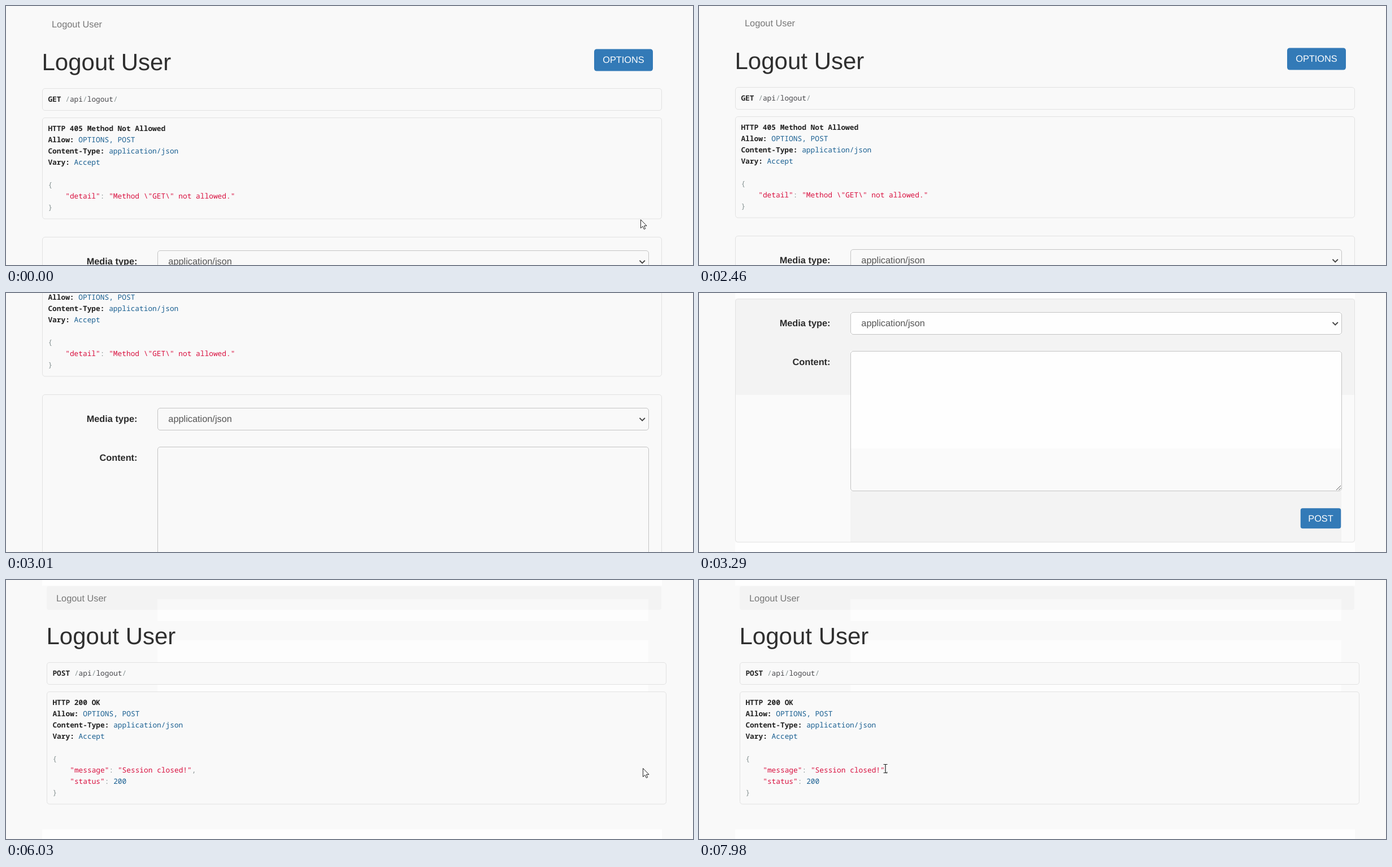
Recreate the animation shown at these times as an HTML page. Size 1216 px wide and 460 px high, loop 8 s.

```html
<!DOCTYPE html>
<html lang="en">
<head>
<meta charset="utf-8">
<title>Logout User</title>
<style>
  html, body { margin: 0; width: 100%; height: 100%; overflow: hidden; background: #f9f9f9; }
  svg { display: block; }
  text { font: 16.33px "Liberation Sans", Arial, sans-serif; fill: #333; text-rendering: geometricPrecision; }
  .mono { font: 12.83px "Noto Sans Mono", "DejaVu Sans Mono", monospace; }
  .bold { font-weight: 700; fill: #222; }
  .title { font-size: 42px; fill: #2f2f2f; }
  .nav { fill: #777; }
  .label { font-weight: 700; text-anchor: end; fill: #2b2b2b; }
  .field { fill: #555; }
  .caption { fill: #fff; text-anchor: middle; }
  .pun { fill: #889494; }
  .val { fill: #195f91; }
  .str { fill: #d9103f; }
  .path { fill: #48484c; }
</style>
</head>
<body>
<svg id="stage" width="1216" height="460" viewBox="0 0 1216 460"></svg>
<script>
const LOOP = 8000, STEP = 70;
const HIDE_AT = 770, REST_AT = 3290, RETURN_AT = 3720, PRESS_AT = 4540, RESULT_AT = 5270;
const LEADING = 20, CHAR = 7.7, PAD = 10.4;

// ---- markup helpers ----
const text = (x, y, cls, s) => `<text x="${x}" y="${y}" class="${cls}">${s}</text>`;
const mono = (x, y, runs) => text(x, y, 'mono', runs.map(([cls, s]) =>
  `<tspan class="${cls}">${s.replace(/ /g, '\u00a0')}</tspan>`).join(''));
const tone = (x, y, w, h, fill, rx = 0) =>
  `<rect x="${x}" y="${y}" width="${w}" height="${h}" rx="${rx}" fill="${fill}"/>`;
const box = (x, y, w, h, stroke = '#e2e2e2', fill = 'none') =>
  `<rect x="${x + .5}" y="${y + .5}" width="${w - 1}" height="${h - 1}" rx="4.5" fill="${fill}" stroke="${stroke}"/>`;
const panel = (x, y, h) => box(x, y, 1097, h, '#e2e2e2', '#f9f9f9');
const field = (y, h) => box(268, y, 870, h, '#c4c4c4');
const band = (y, h, fill) => tone(268, y, 869, h, fill);
const edges = tone(64, 0, 1097, 10, '#fefefe') + tone(64, 443, 1097, 17, '#fefefe');

// The part both pages share: heading, request line, response headers and body.
function response(x, verb, status, rows) {
  const left = x + PAD;
  const lines = [
    [['bold', status]],
    [['bold', 'Allow: '], ['val', 'OPTIONS, POST']],
    [['bold', 'Content-Type: '], ['val', 'application/json']],
    [['bold', 'Vary: '], ['val', 'Accept']],
    [],
    [['pun', '{']],
    ...rows.map(row => [['str', '    '], ...row]),
    [['pun', '}']]
  ];
  return text(x + 17, 37.5, 'nav', 'Logout User') + text(x - .5, 114, 'title', 'Logout User') +
    panel(x, 146, 40) +
    mono(left, 170, [['bold', verb + ' '], ['pun', '/'], ['path', 'api'], ['pun', '/'], ['path', 'logout'], ['pun', '/']]) +
    panel(x, 198, lines.length * LEADING + 20.5) +
    lines.map((runs, i) => mono(left, 222 + i * LEADING, runs)).join('');
}

// ---- scenes ----
const restTones = edges +
  tone(64, 11, 1097, 170, '#f3f3f3', 4) + tone(64, 181, 1097, 261, '#fafafa') +
  band(352, 90, '#f3f3f3') + band(34, 40, '#fefefe') +
  band(103, 173, '#fefefe') + band(276, 76, '#fafafa');

const formPage =
  response(64, 'GET', 'HTTP 405 Method Not Allowed',
    [[['str', '"detail"'], ['pun', ': '], ['str', '"Method \\"GET\\" not allowed."']]]) +
  tone(1041, 76.5, 104, 39, '#337ab7', 4.5) + text(1093, 101, 'caption', 'OPTIONS') +
  box(64, 410, 1097, 433) +
  text(232.5, 459, 'label', 'Media type:') +
  field(434, 40) + text(287.3, 459, 'field', 'application/json') +
  '<path d="M1121.5 452l4.7 4.7 4.7-4.7" fill="none" stroke="#444" stroke-width="1.8"/>' +
  text(232.5, 528, 'label', 'Content:') +
  field(503, 249) +
  '<path d="M1128 750l8-8M1132.5 750l3.5-3.5" stroke="#555"/>' +
  '<g id="ring">' + tone(1063, 780.5, 75, 39.5, '#14181c', 5) + tone(1064.5, 782, 72, 36.5, '#fff', 4) + '</g>' +
  '<rect id="post" x="1065.5" y="783" width="70" height="34.5" rx="3" stroke-width="1.5"/>' +
  text(1100.5, 806, 'caption', 'POST');

const resultPage = edges +
  tone(72, 11, 1088, 42, '#f3f3f3', 4) +
  band(34, 19, '#f8f8f8') + band(53, 20, '#fdfdfd') + band(107, 91, '#fdfdfd') +
  response(72, 'POST', 'HTTP 200 OK', [
    [['str', '"message"'], ['pun', ': '], ['str', '"Session closed!"'], ['pun', ',']],
    [['str', '"status"'], ['pun', ': '], ['val', '200']]
  ]);

const pointers =
  '<g id="pointer" stroke-linejoin="round" fill="#fff" stroke="#222">' +
  '<path id="arrow" d="M.5.5V15.5L4 12.3 6.4 17.5 8.7 16.5 6.4 11.4H11Z"/>' +
  '<path id="beam" d="M-3.5-7.5H3.5M0-7.5V7.5M-3.5 7.5H3.5" stroke-width="1.2"/>' +
  '<path id="hand" d="M-1.5 1q1.5-2 3 0V7.5q2-1.2 3 .5q2-1 2.8 1q2.2-.8 2.5 1.2V14q0 3-2 6H0Q-2 17-4.5 13q-1.5-2.5.5-3q1.2 0 2.5 2Z"/>' +
  '</g>';

const stage = document.getElementById('stage');
stage.innerHTML = `<g id="rest">${restTones}</g><g id="form">${formPage}</g>` +
  `<g id="result">${resultPage}</g>${pointers}`;
const el = id => document.getElementById(id);
const show = (id, on) => el(id).setAttribute('display', on ? 'inline' : 'none');

// ---- motion ----
const clamp = u => Math.min(Math.max(u, 0), 1);
const smooth = u => u * u * (3 - 2 * u);
const easeOut = u => 1 - (1 - u) ** 2;
const glide = (t, from, to) => smooth(clamp((t - from) / (to - from)));

// Two turns of the wheel.
const scrollAt = t => Math.round(230 * glide(t, 2432, 2938) + 170 * glide(t, 3060, 3290));

// The pointer follows each route in even time steps and rests at its end.
const route = (from, to, d) => {
  const line = document.createElementNS('http://www.w3.org/2000/svg', 'path');
  line.setAttribute('d', d);
  return { from, to, line, steps: Math.round((to - from) / STEP) };
};
const routes = [
  route(0, 70, 'M1123 379L1096 335'),
  route(360, 700, 'M1099 333Q1120 305 1129 257'),
  route(3720, 4470, 'M1122 309L1137 314Q1138 370 1111 392'),
  route(4540, 4870, 'M1111 392Q1126 372 1127 335'),
  route(6030, 6790, 'M1127 334L913 307 507 327 400 375 330 348'),
  route(6860, 7690, 'M320 350L256 353Q300 353 329 341'),
  route(7840, 7980, 'M329 340L330 334.5')
];

function pointerAt(t) {
  const { from, to, line, steps } = routes.filter(r => r.from <= t).pop();
  const step = Math.floor((t - from) / (to - from) * steps + 1e-6);
  return line.getPointAtLength(line.getTotalLength() * easeOut(clamp(step / steps)));
}

function pointerKind(t, { x, y }) {
  if (t >= HIDE_AT && t < RETURN_AT) return null;
  if (t >= RESULT_AT) return x < 340 && y < 345 ? 'beam' : 'arrow';
  if (t < REST_AT) return 'arrow';
  if (y > 380 && x < 1137) return 'hand';
  return y < 352 && x < 1135 ? 'beam' : 'arrow';
}

function draw(t) {
  const done = t >= RESULT_AT, resting = t >= REST_AT && !done;
  show('rest', resting);
  show('form', !done);
  show('result', done);
  el('form').setAttribute('transform', `translate(0 ${-scrollAt(t)})`);

  const spot = pointerAt(t), kind = pointerKind(t, spot);
  ['arrow', 'beam', 'hand'].forEach(id => show(id, id === kind));
  el('pointer').setAttribute('transform', `translate(${Math.round(spot.x)} ${Math.round(spot.y)})`);

  const focused = t >= PRESS_AT, over = kind === 'hand';
  const fill = focused && over ? '#204d74' : focused || over ? '#286090' : '#337ab7';
  show('ring', focused);
  el('post').setAttribute('fill', fill);
  el('post').setAttribute('stroke', focused ? '#10202c' : fill);
}

const began = performance.now();
function tick() {
  draw((performance.now() - began) % LOOP);
  requestAnimationFrame(tick);
}
draw(0);
requestAnimationFrame(tick);
</script>
</body>
</html>
```
